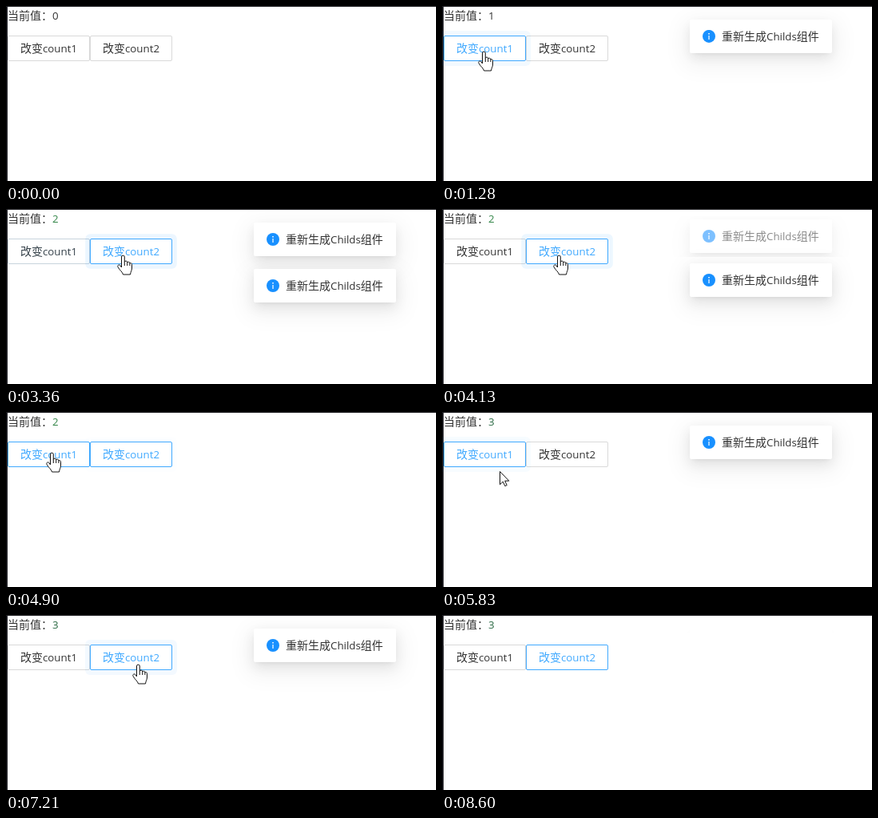
An HTML page that plays this animation: 538 px wide and 219 px high, repeating every 8.92 s.

```html
<!DOCTYPE html>
<html lang="zh-CN">
<head>
<meta charset="utf-8">
<style>
html, body { margin: 0; width: 100%; height: 100%; overflow: hidden; background: #fff; }
body { position: relative; color: #333; font: 14px/22px "Open Sans", "Noto Sans CJK SC", "Noto Sans CJK", sans-serif; white-space: nowrap; }
body > * { position: absolute; box-sizing: border-box; }
i { font-style: normal; font-size: 13.3px; line-height: 0; }
.edge { inset: 0; border: solid #1c1c20; border-width: 1px 0 0 2px; }
.value { left: 2px; top: 1px; }
.btn { top: 37px; width: 103px; height: 32px; border: 1px solid; border-radius: 2px; padding-left: 15px; line-height: 30px; background: #fff; }
.notice { left: 210px; width: 378px; }
.toast { position: relative; margin: 0 100px; width: 178px; height: 42px; padding: 10px 0 0 40px; box-sizing: border-box; border-radius: 2px; background: #fff;
  box-shadow: 0 3px 6px -4px rgba(0,0,0,.12), 0 6px 16px rgba(0,0,0,.08), 0 9px 28px 8px rgba(0,0,0,.05); }
.toast svg { position: absolute; left: 16px; top: 13px; }
#cursor { left: 0; top: 0; width: 100%; height: 100%; fill: #fff; stroke: #111; stroke-linejoin: round; }
</style>
</head>
<body>
<div class="value">当前值：<i id="count">0</i></div>
<div class="btn" style="left:2px">改变<i>count1</i></div>
<div class="btn" style="left:105px">改变<i>count2</i></div>
<svg id="cursor"><g id="pointer">
  <path id="arrow" d="M.5 .5V16.8L4.3 13.2 6.8 18.7 9.2 17.6 6.7 12.2H11.8Z"/>
  <g id="hand">
    <path d="M-1.5 15V2a1.9 1.9 0 0 1 3.8 0V8.5a1.7 1.7 0 0 1 3.4 .6a1.7 1.7 0 0 1 3.2 .9a1.6 1.6 0 0 1 2.6 1.3V16c0 3-1.5 4-2 8H.5C0 21-4 18.5-6 14.5c-1-2 1.5-3.6 3-1.8Z"/>
    <path d="M2.3 8.5V13M5.7 9.1V13M8.9 10V13" fill="none"/>
  </g>
</g></svg>
<div class="edge"></div>
<script>
const LOOP = 8920;
const $ = id => document.getElementById(id);
const clamp = v => Math.min(1, Math.max(0, v));

function bezier(x1, y1, x2, y2) {
  const at = (a, b, s) => 3 * a * s * (1 - s) ** 2 + 3 * b * s * s * (1 - s) + s ** 3;
  return v => {
    if (v <= 0 || v >= 1) return clamp(v);
    let lo = 0, hi = 1;
    for (let n = 0; n < 20; n++) {
      const mid = (lo + hi) / 2;
      if (at(x1, x2, mid) < v) lo = mid; else hi = mid;
    }
    return at(y1, y2, lo);
  };
}
const ease = bezier(.25, .1, .25, 1);
const circ = bezier(.08, .82, .17, 1);
const inOut = bezier(.645, .045, .355, 1);

// Counting clicks; each also opens a notice for three seconds
const counts = [970, 1360, 5330];
const digitColors = ["#333", "#333", "#35874a", "#2c6b45"];

// Highlight spans cover both hover and focus
const buttons = [
  { clicks: counts, lit: [[640, 3150], [4560, 6880]] },
  { clicks: [3150, 3900, 6880], lit: [[2660, 5330], [6720, LOOP]] }
];
document.querySelectorAll(".btn").forEach((el, k) => buttons[k].el = el);

const notices = counts.map(click => {
  const el = document.createElement("div");
  el.className = "notice";
  el.innerHTML = `<div class="toast"><svg width="16" height="16"><circle cx="8" cy="8" r="8" fill="#1890ff"/>
    <path d="M7.4 7h1.2v5H7.4zM7.2 4h1.6v1.6H7.2z" fill="#fff"/></svg>重新生成<i>Childs</i>组件</div>`;
  document.body.insertBefore(el, $("cursor"));
  return { el, start: click + 50, end: click + 3080 };
});

// Cursor hot spot: time, x, y
const path = [
  [120, 268, 194], [450, 150, 130], [700, 55, 60], [900, 52, 57], [1750, 52, 57],
  [2100, 165, 135], [2440, 158, 86], [2590, 156, 73], [2750, 147, 59], [2910, 146, 58],
  [4300, 146, 58], [4700, 60, 54], [4970, 56, 50], [5740, 57, 50], [5830, 72, 74],
  [6150, 122, 165], [6450, 214, 130], [6670, 196, 75], [6800, 165, 62], [7350, 165, 62],
  [7600, 417, 176], [7700, 470, 202], [7830, 484, 222]
];

function drawButton({ el, clicks, lit }, t) {
  const on = Math.max(...lit.map(([a, b]) => inOut(clamp((t - a) / 300)) - inOut(clamp((t - b) / 300))));
  const mix = (from, to) => `rgb(${from.map((c, k) => c + (to[k] - c) * on)})`;
  const blue = [64, 169, 255];
  el.style.color = mix([51, 51, 51], blue);
  el.style.borderColor = mix([217, 217, 217], blue);
  el.style.zIndex = on > .5 ? 1 : 0;
  const age = t - Math.max(-LOOP, ...clicks.filter(c => c <= t));
  el.style.boxShadow = `0 0 0 ${6 * circ(age / 400)}px rgba(24,144,255,${.2 * (1 - circ(age / 2000))})`;
}

function drawNotices(t) {
  let top = 9;
  for (const { el, start, end } of notices) {
    const shown = t >= start && t < end + 300;
    el.style.display = shown ? "block" : "none";
    if (!shown) continue;
    const enter = circ((t - start) / 300), stay = 1 - ease((t - end) / 300);
    const height = Math.min(42 + 16 * stay, 150 * stay);
    Object.assign(el.style, {
      top: top + "px",
      height: height + "px",
      paddingTop: 8 * stay + "px",
      opacity: enter * stay,
      overflow: stay < 1 ? "hidden" : "visible",
      transform: `translateY(${(enter - 1) * 58}px)`
    });
    top += height;
  }
}

function drawCursor(t) {
  const k = path.findIndex(p => p[0] > t);
  $("cursor").style.display = k > 0 ? "block" : "none";
  if (k < 1) return;
  const [a, b] = [path[k - 1], path[k]];
  const s = (t - a[0]) / (b[0] - a[0]);
  const x = a[1] + (b[1] - a[1]) * s, y = a[2] + (b[2] - a[2]) * s;
  const over = x > 2 && x < 208 && y > 37 && y < 69;
  $("pointer").setAttribute("transform", `translate(${Math.round(x)} ${Math.round(y)})`);
  $("hand").style.display = over ? "inline" : "none";
  $("arrow").style.display = over ? "none" : "inline";
}

$("cursor").style.zIndex = 2;

function draw(now) {
  const t = now % LOOP;
  const n = counts.filter(c => c <= t).length;
  $("count").textContent = n;
  $("count").style.color = digitColors[n];
  buttons.forEach(b => drawButton(b, t));
  drawNotices(t);
  drawCursor(t);
}

let origin;
function tick(now) {
  origin ??= now;
  draw(now - origin);
  requestAnimationFrame(tick);
}
draw(0);
requestAnimationFrame(tick);
</script>
</body>
</html>
```
